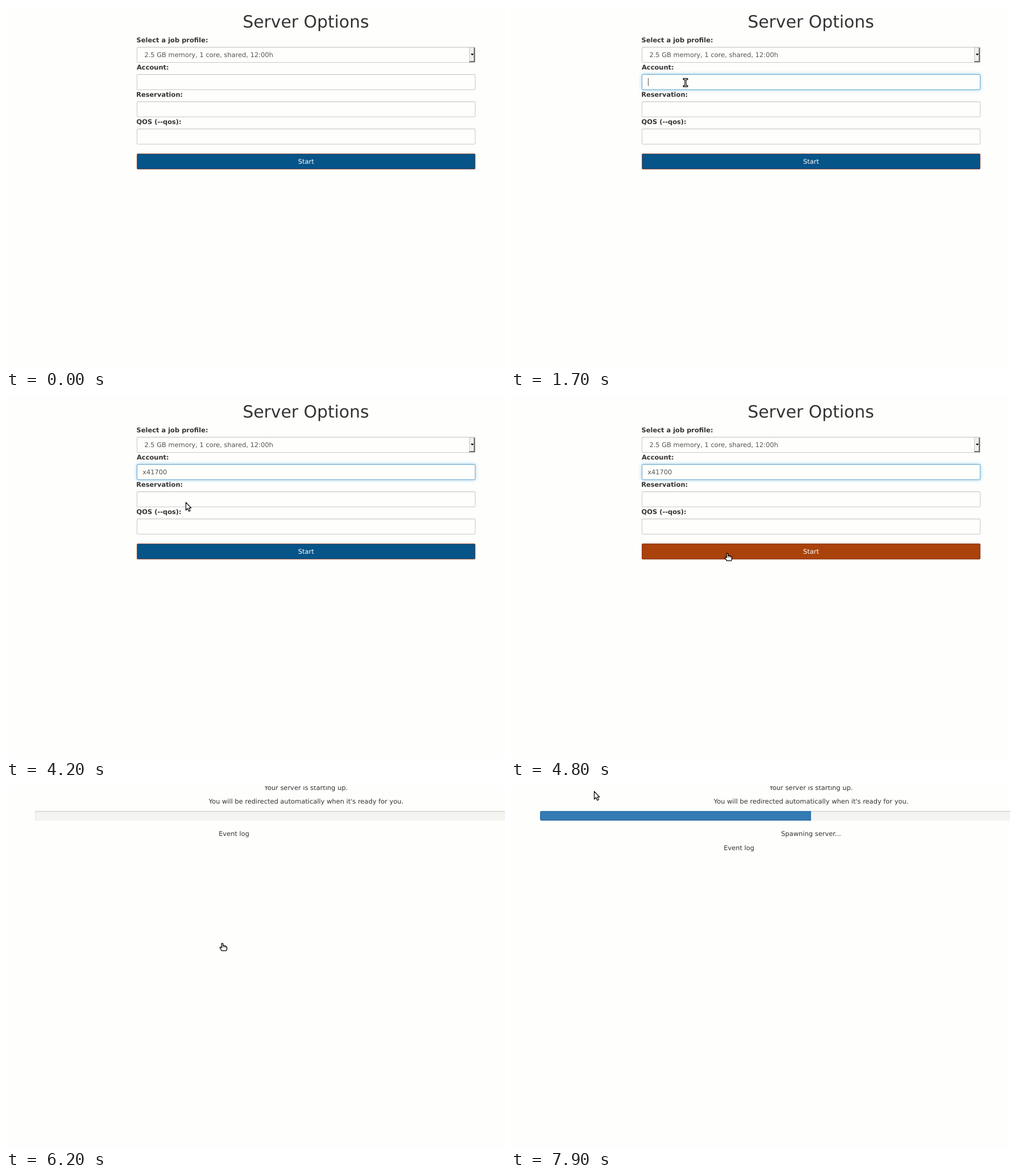
Write an HTML page that moves like this. It is 878 by 638 pixels and loops after 8 s.

```html
<!DOCTYPE html>
<html lang="en">
<head>
<meta charset="utf-8">
<title>Server Options</title>
<style>
  html, body { margin: 0; width: 100%; height: 100%; overflow: hidden; background: #fefffc; }
  #stage { position: absolute; left: 0; top: 0; width: 878px; height: 638px; overflow: hidden; }
  #stage div { position: absolute; box-sizing: border-box; }
  #stage .page { inset: 0; }
  .field { left: 230px; width: 596px; height: 28px; border: 1px solid #c9cac7; border-radius: 2px;
           box-shadow: inset 0 1px 1px rgba(0,0,0,.06); }
  #start { left: 230px; top: 260px; width: 596px; height: 28px; border: 1px solid; border-radius: 2px; }
  #drop { left: 815px; top: 73px; width: 10px; height: 26px; background: #f0f0ee;
          border: solid; border-width: 1px 2px 2px 1px; border-color: #d8d8d6 #6e6e6e #6e6e6e #c4c4c2; }
  #track { left: 51px; top: 44px; width: 954px; height: 16.5px; border-radius: 3px; overflow: hidden;
           background: #f4f5f1; box-shadow: inset 0 1px 2px rgba(0,0,0,.2); }
  #fill { left: 0; top: 0; height: 100%; background: #347ab3; box-shadow: inset 0 -1px 0 rgba(0,0,0,.15); }
  svg { position: absolute; left: 0; top: 0; }
  text { font: 11.45px "DejaVu Sans", sans-serif; fill: #333; text-rendering: geometricPrecision; }
  .bold { font-weight: bold; }
  .mid { text-anchor: middle; }
  .value { fill: #555; }
  .title { font-size: 29.8px; }
  .light { fill: #fff; }
  #cursor path { stroke-linejoin: round; stroke-linecap: round; }
</style>
</head>
<body>
<div id="stage">
  <div class="page" id="form">
    <div class="field" style="top:72px"></div>
    <div id="drop"></div>
    <div class="field" id="account" style="top:120px"></div>
    <div class="field" style="top:168px"></div>
    <div class="field" style="top:216px"></div>
    <div id="start"></div>
    <svg width="878" height="638">
      <text class="title mid" x="527.7" y="38">Server Options</text>
      <text class="bold" x="229.6" y="63.7">Select a job profile:</text>
      <text class="value" x="243.4" y="90">2.5 GB memory, 1 core, shared, 12:00h</text>
      <path d="M817.7 84h5.4l-2.7 3.2z"/>
      <text class="bold" x="230" y="111.8">Account:</text>
      <text class="value" id="typed" x="240.2" y="138"></text>
      <rect id="caret" y="127" width="1" height="14" fill="#555"/>
      <text class="bold" x="229.2" y="159.9">Reservation:</text>
      <text class="bold" x="229.6" y="208">QOS (--qos):</text>
      <text class="light mid" x="528" y="278.3">Start</text>
    </svg>
  </div>
  <div class="page" id="loading">
    <div id="track"><div id="fill"></div></div>
    <svg width="878" height="638">
      <text class="mid" x="528" y="6.7">Your server is starting up.</text>
      <text class="mid" x="528" y="31.2">You will be redirected automatically when it's ready for you.</text>
      <text class="mid" id="status" x="528" y="88.3">Spawning server...</text>
      <text id="log" x="374.2">Event log</text>
    </svg>
  </div>
  <svg width="878" height="638">
    <g id="cursor">
      <path id="arrow" d="M.5.5V14.2L3.6 11.3 5.8 16.2 8.2 15.1 6 10.4H9.8Z" fill="#fff" stroke="#000" stroke-width="1.2"/>
      <g id="beam" fill="none">
        <path d="M-3-6.3H3M-3 6.3H3M0-6V6" stroke="#000" stroke-width="3.4"/>
        <path d="M-2.6-6.3H2.6M-2.6 6.3H2.6M0-6V6" stroke="#fff" stroke-width="1.1"/>
      </g>
      <g id="hand">
        <path d="M-1.6 8V.8Q-.3-.7 .8.8V4.6Q2.3 3.7 3.2 5Q4.7 4.3 5.5 5.6Q7.6 5.4 7.6 7.4V10.5L6.6 13.4H-1.2L-4.6 8.4Q-4.5 6.4-2.6 7.2Z" fill="#fff" stroke="#000" stroke-width="1.3"/>
        <path d="M.8 5V7.5M3.2 5.4V7.7M5.5 6V8" stroke="#000" stroke-width=".7"/>
      </g>
    </g>
  </svg>
</div>
<script>
const $ = id => document.getElementById(id);
const LOOP = 8000, TICK = 100;
const ACCOUNT = 'x41700';
const keyTimes = [2400, 2700, 3000, 3200, 3300, 3400];

// Pointer moves: start time, then one point per tick
const moves = [
  [600, [[247, 108], [257, 112], [274, 120], [291, 128], [302, 133], [307, 135]]],
  [3900, [[308, 138], [309, 150], [312, 168], [316, 187], [330, 216], [352, 248], [373, 271], [381, 277]]],
  [7500, [[368, 262], [310, 196], [224, 98], [163, 28], [146, 9]]]
];

// Opacity of the focus glow, one value per tick
const focusIn = [.25, .8, 1], focusOut = [1, .6, .2, 0];
const sample = (list, t, from) => list[Math.min(list.length - 1, Math.floor((t - from) / TICK))];

const show = (id, on) => $(id).style.display = on ? '' : 'none';
const mix = (a, b, k) => `rgb(${a.map((v, i) => Math.round(v + (b[i] - v) * k))})`;

// CSS "ease", cubic-bezier(.25,.1,.25,1)
function ease(x) {
  let lo = 0, hi = 1, u = .5;
  for (let i = 0; i < 20; i++) {
    u = (lo + hi) / 2;
    const bx = .75 * u * (1 - u) + u ** 3;
    if (bx < x) lo = u; else hi = u;
  }
  return .3 * u * (1 - u) ** 2 + 3 * u * u * (1 - u) + u ** 3;
}

function drawPointer(t) {
  const move = moves.filter(m => t >= m[0]).pop();
  show('cursor', move);
  if (!move) return;
  const [x, y] = sample(move[1], t, move[0]);
  const kind = t < 6300 && y > 260 ? 'hand' : t < 6200 && y > 120 && y < 148 ? 'beam' : 'arrow';
  for (const k of ['arrow', 'beam', 'hand']) show(k, k === kind);
  $('cursor').setAttribute('transform', `translate(${x} ${y})`);
}

function drawForm(t) {
  const focus = t < 1500 ? 0 : t < 4800 ? sample(focusIn, t, 1500) : sample(focusOut, t, 4800);
  const account = $('account').style;
  account.borderColor = mix([201, 202, 199], [98, 168, 209], focus);
  account.boxShadow = `inset 0 1px 1px rgba(0,0,0,.06), 0 0 6.5px rgba(102,175,233,${.6 * focus})`;

  $('typed').textContent = ACCOUNT.slice(0, keyTimes.filter(k => t >= k).length);
  show('caret', t >= 1500 && t < 3900);
  const width = $('typed').textContent ? $('typed').getComputedTextLength() : 0;
  $('caret').setAttribute('x', Math.round(240.8 + width));

  const hover = t >= 4500, pressed = t >= 4800 && t < 5000;
  const glow = t < 4900 ? 0 : 1 - sample(focusOut, t, 4800);
  const start = $('start').style;
  start.background = pressed ? '#a9420b' : hover ? '#c9510f' : '#075489';
  start.borderColor = hover ? '#8c3413' : '#94553f';
  start.boxShadow = `0 0 6px rgba(102,160,215,${.5 * glow})`;
}

function drawLoading(t) {
  const spawning = t >= 6300;
  const x = t >= 7000 ? 1 : Math.max(0, Math.min(.9, (t - 6260) / 600));
  $('fill').style.width = 50 * ease(x) + '%';
  show('fill', spawning);
  show('status', spawning);
  $('log').setAttribute('y', spawning ? 112.8 : 88.3);
}

function draw(now) {
  const t = Math.floor(now % LOOP / TICK) * TICK;
  const loading = t >= 6200;
  show('form', !loading);
  show('loading', loading);
  (loading ? drawLoading : drawForm)(t);
  drawPointer(t);
}

const began = performance.now();
function frame() {
  draw(performance.now() - began);
  requestAnimationFrame(frame);
}
frame();
</script>
</body>
</html>
```
